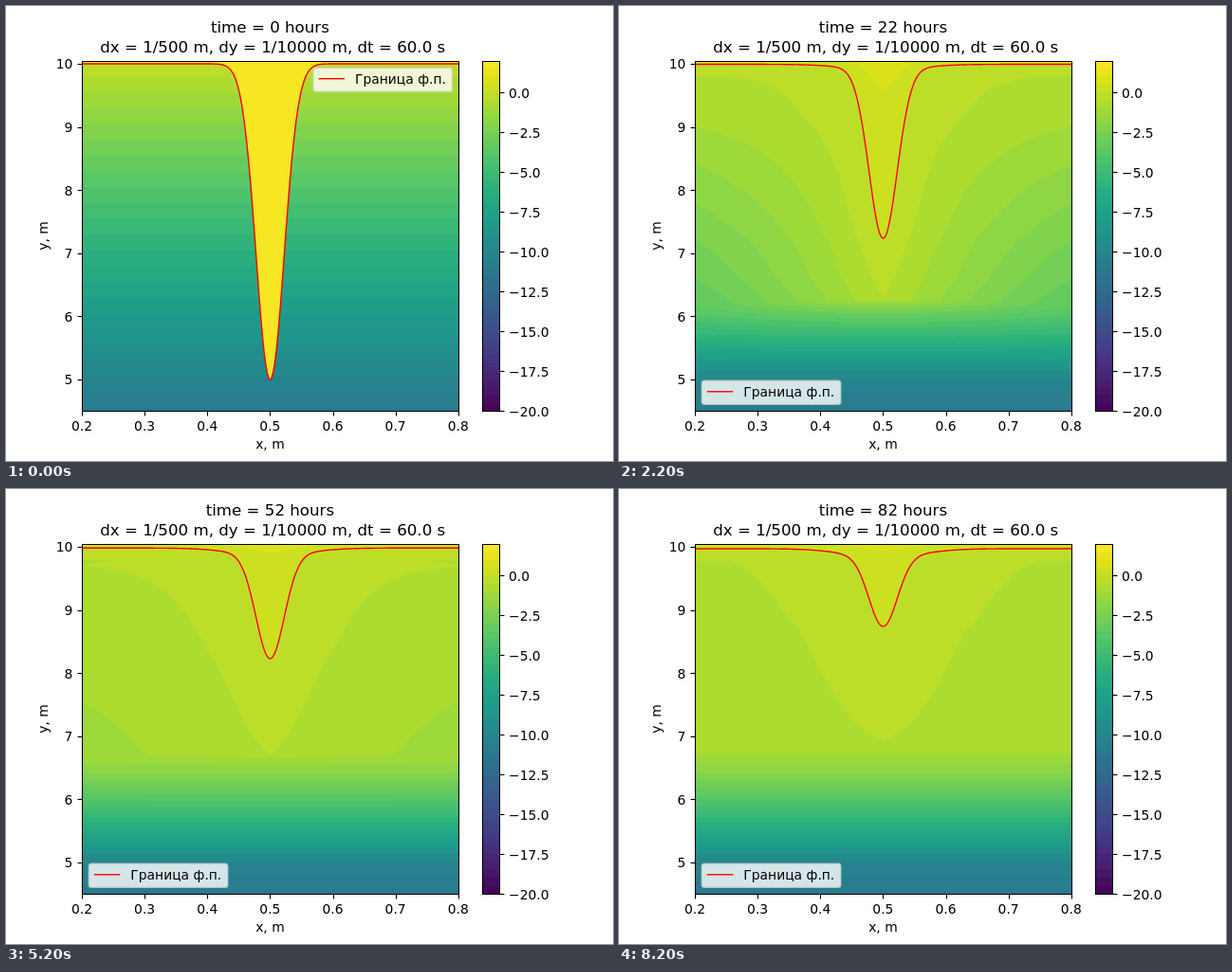
An HTML page with a canvas that plays this animation: 640x480 px, repeating every 8400 ms.

```html
<!DOCTYPE html>
<html lang="ru">
<head>
<meta charset="utf-8">
<style>
html, body { margin: 0; width: 100%; height: 100%; overflow: hidden; background: #fff; }
canvas { display: block; }
</style>
</head>
<body>
<canvas id="c" width="640" height="480"></canvas>
<script>
const ctx = document.getElementById('c').getContext('2d');
const FRAMES = 42, STEP = 200;
const LEFT = 81, RIGHT = 477, TOP = 58, BOTTOM = 428, CX = 278.5;

// Viridis, 17 even stops
const stops = ('440154 48186a 472d7b 424086 3b528b 33638d 2c728e 26828e 21918c ' +
  '1fa088 28ae80 3fbc73 5ec962 84d44b addc30 d8e219 fde725').split(' ')
  .map(s => [0, 2, 4].map(i => parseInt(s.substr(i, 2), 16)));
const bands = Array.from({ length: 44 }, (_, i) => {
  const p = (i + 0.5) / 44 * 16, k = Math.floor(p);
  return stops[k].map((v, j) => Math.round(v + (stops[k + 1][j] - v) * (p - k)));
});
const bandOf = T => Math.max(0, Math.min(43, Math.floor((T + 20) * 2)));

// Values keyed by hours, interpolated in sqrt(time)
const hours = [0, 4, 10, 22, 44, 60, 82];
function keyed(values, h) {
  let i = 0;
  while (i < 5 && h > hours[i + 1]) i++;
  const a = Math.sqrt(hours[i]), b = Math.sqrt(hours[i + 1]);
  return values[i] + (values[i + 1] - values[i]) * (Math.sqrt(h) - a) / (b - a);
}
const floorY = h => keyed([394, 357, 337, 310, 285, 275, 265], h);
const shrink = h => keyed([0, 103, 167, 275, 442, 536, 668], h);
const coreTip = h => keyed([390, 245, 150, 88, 67, 66, 65], h);
const coreWidth = h => keyed([14, 14, 16.5, 18, 30, 30, 30], h);

// Height of the phase boundary at distance d (px) from the centre
function frontFn(h) {
  const base = 61 + 2 * h / 82, s = shrink(h), wing = 9 * Math.pow(h / 82, 0.4);
  return d => base + 333 * Math.exp(-(d * d + s) / 440) + wing * Math.exp(-((d / 55) ** 2));
}

// Sideways heat flow in each pixel row: the centre is held until the row has frozen.
// Row 0 stands for all rows that never freeze through.
const N = 50, W = N + 1, FIRST = 262, LAST = 394, ROWS = LAST - FIRST + 1;
const CELL = 661.3 * 0.5 / N;
function simulate() {
  const u = new Float32Array(ROWS * W).fill(1), q = 0.425, perFrame = 200;
  const shots = [u.slice()];
  for (let f = 1; f < FRAMES; f++) {
    for (let s = 0; s < perFrame; s++) {
      const floor = floorY(2 * (f - 1 + s / perFrame));
      for (let r = 0; r < ROWS; r++) {
        const o = r * W;
        let prev = u[o + 1];
        for (let i = 0; i <= N; i++) {
          const cur = u[o + i], next = u[o + (i < N ? i + 1 : N - 1)];
          u[o + i] = cur + q * (prev - 2 * cur + next);
          prev = cur;
        }
        if (r === 0 || FIRST + r < floor) u[o] = 0;
      }
    }
    shots.push(u.slice());
  }
  return shots;
}
const shots = simulate();

function rowTemp(f, h) {
  const front = frontFn(h), u = shots[f];
  const tip = front(0), floor = floorY(h), core = coreTip(h), width = coreWidth(h);
  const glow = 14 * Math.exp(-h / 12), aged = Math.sqrt(Math.min(1, h / 60));

  function inside(d, y, edge) {
    if (h === 0) return 1.9;
    const c = 59 + (core - 59) * Math.exp(-((d / width) ** 2));
    const T = y > c ? 0.5 * (edge - y) / (edge - c) : 0.5 + 0.49 * (c - y) / (c - 57);
    const k = 1 + glow * Math.exp(-d * d / 2500);
    return T + 0.9 * Math.max(0, 1 - (y - 57) / k);
  }

  return y => {
    const start = -0.0301 * (y - 58.3);
    let R = 0;
    while (R < 200 && front(R) > y) R += 0.5;
    const mid = y > tip ? -0.5 * Math.min(1, (y - tip) / (floor - tip)) : 0;
    const far = -0.52 * Math.max(aged, Math.exp(-Math.max(0, y - 75) / 80));
    const drop = Math.min(0, far - mid) * Math.max(0, Math.min(1, (y - front(200)) / 13));
    const row = Math.floor(y) - FIRST, o = Math.max(0, row) * W;
    return d => {
      const edge = front(d);
      if (y < edge) return inside(d, y, edge);
      if (row >= ROWS) return start;
      const p = Math.max(0, d - R / 2) / CELL, i = Math.min(N - 1, Math.floor(p));
      const g = u[o + i] + (u[o + i + 1] - u[o + i]) * (p - i);
      const c = y > floor ? -0.5 : mid + drop * (1 - Math.exp(-Math.max(0, d - R) / 40));
      return Math.min(-0.001, c + (start - c) * g);
    };
  };
}

function drawField(f, h) {
  const w = RIGHT - LEFT, img = ctx.createImageData(w, BOTTOM - TOP);
  const rowAt = rowTemp(f, h);
  let k = 0;
  for (let y = TOP; y < BOTTOM; y++) {
    const temp = rowAt(y + 0.5);
    for (let x = LEFT; x < RIGHT; x++, k += 4) {
      const rgb = bands[bandOf(temp(Math.abs(x + 0.5 - CX)))];
      img.data[k] = rgb[0];
      img.data[k + 1] = rgb[1];
      img.data[k + 2] = rgb[2];
      img.data[k + 3] = 255;
    }
  }
  ctx.putImageData(img, LEFT, TOP);
}

function line(x1, y1, x2, y2) {
  ctx.beginPath();
  ctx.moveTo(x1, y1);
  ctx.lineTo(x2, y2);
  ctx.stroke();
}
function text(s, x, y, align = 'center', size = 13.89) {
  ctx.font = size + 'px "DejaVu Sans", sans-serif';
  ctx.textAlign = align;
  ctx.fillText(s, x, y);
}
function pen(color, width) {
  ctx.strokeStyle = color;
  ctx.lineWidth = width;
}
const snap = v => Math.round(v) + 0.5;

function drawFront(h) {
  const front = frontFn(h);
  pen('#f00', 1.4);
  ctx.lineJoin = 'round';
  ctx.beginPath();
  for (let x = 80; x <= 477; x++) ctx.lineTo(x, front(Math.abs(x - CX)));
  ctx.stroke();
}

function drawAxes() {
  pen('#000', 1.1);
  ctx.fillStyle = '#000';
  for (let i = 0; i < 7; i++) {
    const x = 80 + i * 66.13;
    line(snap(x), 428, snap(x), 432.5);
    text((0.2 + i / 10).toFixed(1), x, 448);
  }
  for (let v = 5; v <= 10; v++) {
    const y = 61 + (10 - v) * 66.6;
    line(75.5, snap(y), 80, snap(y));
    text(v, 70.3, y + 5.3, 'right');
  }
  ctx.strokeRect(80.5, 58.5, 397, 369);
  text('x, m', 278.4, 467);
  ctx.save();
  ctx.translate(44, 242.5);
  ctx.rotate(-Math.PI / 2);
  text('y, m', 0, 0);
  ctx.restore();
}

function drawColorbar() {
  bands.forEach((rgb, i) => {
    ctx.fillStyle = `rgb(${rgb})`;
    const y = 427.2 - (i + 1) * 8.4;
    ctx.fillRect(502, Math.round(y), 18, Math.round(y + 8.4) - Math.round(y));
  });
  ctx.fillStyle = '#000';
  pen('#000', 1.1);
  ctx.strokeRect(502.5, 58.5, 18, 369);
  for (let v = 0; v >= -20; v -= 2.5) {
    const y = 57.6 + (2 - v) * 16.8;
    line(521, snap(y), 525.5, snap(y));
    text((v < 0 ? '\u2212' : '') + Math.abs(v).toFixed(1), 530, y + 5.3, 'left');
  }
}

function drawLegend(x, y) {
  ctx.beginPath();
  ctx.roundRect(x, y, 146.5, 25, 2.8);
  ctx.fillStyle = 'rgba(255,255,255,.8)';
  ctx.fill();
  pen('rgba(204,204,204,.8)', 1.4);
  ctx.stroke();
  pen('#f00', 1.4);
  line(x + 5.5, y + 11.5, x + 33, y + 11.5);
  ctx.fillStyle = '#000';
  text('Граница ф.п.', x + 44, y + 16.3, 'left');
}

function draw(f) {
  const h = 2 * f;
  ctx.fillStyle = '#fff';
  ctx.fillRect(0, 0, 640, 480);
  drawField(f, h);
  drawFront(h);
  drawAxes();
  drawColorbar();
  if (f) drawLegend(87.3, 395.3);
  else drawLegend(324, 65.2);
  text(`time = ${h} hours`, 278.4, 28, 'center', 16.67);
  text('dx = 1/500 m, dy = 1/10000 m, dt = 60.0 s', 281.2, 49, 'center', 16.67);
}

const begin = performance.now();
let shown = -1;
function tick() {
  const f = Math.floor((performance.now() - begin) / STEP) % FRAMES;
  if (f !== shown) draw(shown = f);
  requestAnimationFrame(tick);
}
tick();
</script>
</body>
</html>
```
